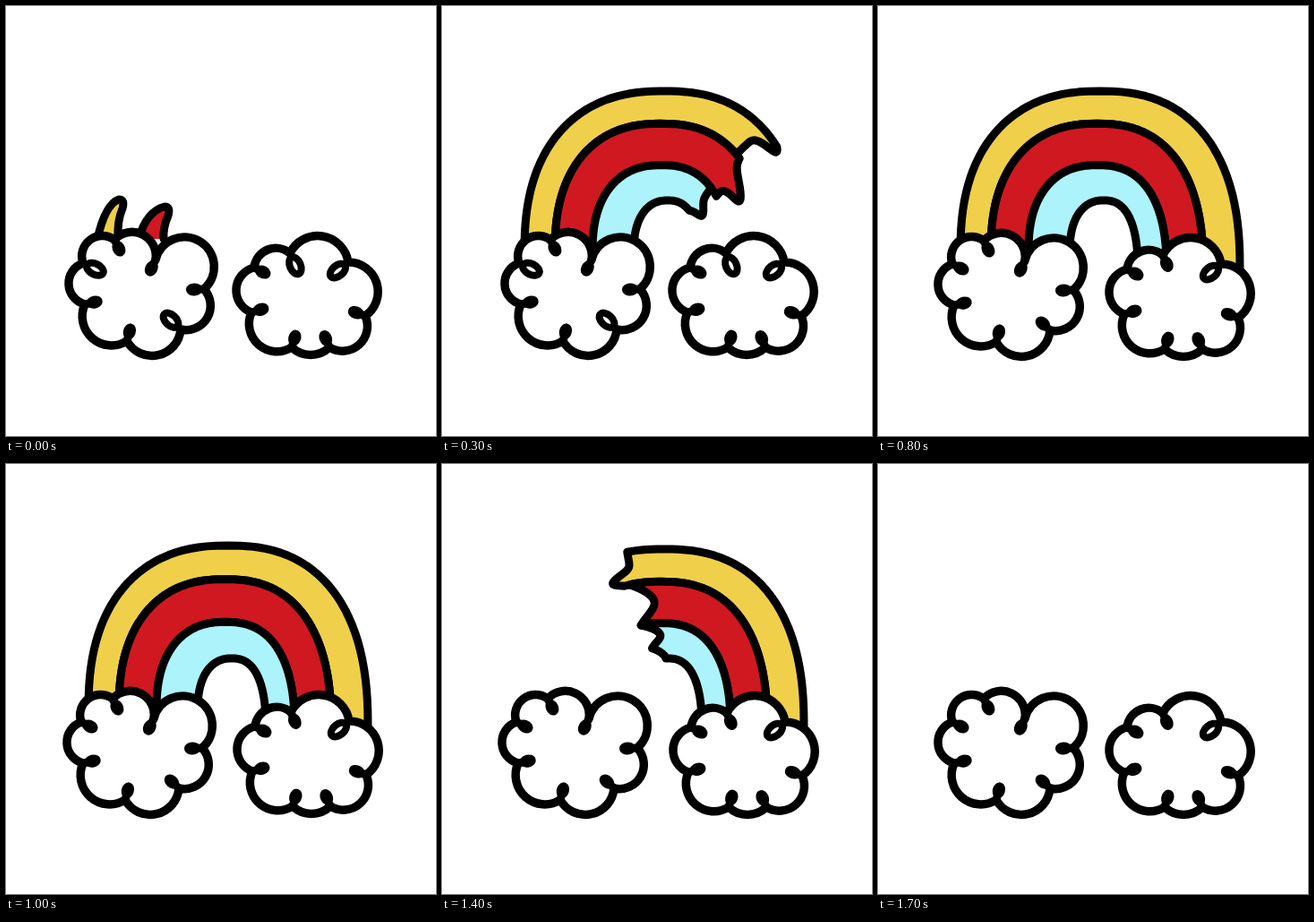
An HTML page with a canvas that plays this animation: 480x480 px, repeating every 1800 ms.

```html
<!DOCTYPE html>
<html lang="en">
<head>
<meta charset="utf-8">
<title>Rainbow</title>
<style>
  html, body { margin: 0; width: 100%; height: 100%; overflow: hidden; background: #fff; }
  canvas { display: block; width: 480px; height: 480px; }
</style>
</head>
<body>
<canvas id="stage" width="480" height="480"></canvas>
<script>
const ctx = document.getElementById('stage').getContext('2d');
const { PI, sin, cos, abs, sign, hypot, atan2 } = Math;
const STEP = 100, STEPS = 18;
const COLORS = ['#f0d04a', '#d01820', '#acf3fb'];

// Rainbow contours, outermost first: left foot, right foot, crown.
const ARCS = [[92, 404, 96], [126, 363, 132], [168, 322, 178], [214, 290, 217]];

// Ragged ends per band: offset along the arc, for u across the band.
const bump = (u, peak) => Math.exp(-(((u - peak) / .2) ** 2));
const HEAD = [
  u => .02 + .06 * bump(u, .08),
  u => .035 + .03 * u + .08 * bump(u, .5),
  u => .025 + .065 * bump(u, .72) - .05 * u ** 4
];
const TAIL = [
  u => .01 - .055 * bump(u, .82),
  u => .06 * sin(PI * u),
  u => .065 * abs(sin(1.5 * PI * u))
];

// Notches of each cloud, clockwise; a third value sets the bulge of the next lobe.
const CLOUDS = [
  {
    mid: [147, 320],
    notches: [[83, 288], [118, 262], [164, 284, .68], [218, 317], [192, 362], [132, 375], [85, 334]]
  },
  {
    mid: [338, 325],
    notches: [[278, 294, .3], [318, 278], [383, 288], [402, 348], [362, 383, .2], [320, 383], [275, 344]]
  }
];

// Three hand-drawn poses in rotation: cloud shifts, notches with open loops, crown lift.
const POSES = [
  { shift: [[3, -1], [-1, -2]], loops: [[0, 4], [1, 2]], lift: 1 },
  { shift: [[1, 0], [0, -1]], loops: [[], [2]], lift: 5 },
  { shift: [[0, 0], [0, 0]], loops: [[], [2]], lift: 1 }
];

const mix = (a, b, k) => a + (b - a) * k;
const clamp = n => Math.max(0, Math.min(1, n));
const sample = (n, fn) => Array.from({ length: n + 1 }, (_, i) => fn(i / n));

// Point at t (left foot 0, right foot 1) on the contour v, as a superellipse.
function place(t, v, lift) {
  const row = Math.min(Math.floor(v), 2);
  const [left, right, top] = ARCS[row].map((n, i) => mix(n, ARCS[row + 1][i], v - row));
  const c = -cos(PI * t), s = abs(sin(PI * t));
  const x = (1 + sign(c) * abs(c) ** (2 / 2.4)) / 2;
  const base = mix(276, 294, x), crown = top - lift * (1 - v / 3);
  return [mix(left, right, x), mix(base, crown, s ** (2 / 2.4))];
}

function band(i, root, end, lift) {
  const run = (v, from, to) => sample(60, k => place(mix(from, to, k), v, lift));
  ctx.beginPath();
  [
    ...run(i, root, end(0)),
    ...sample(30, u => place(end(u), i + u, lift)),
    ...run(i + 1, end(1), root)
  ].forEach(p => ctx.lineTo(...p));
  fillStroke(COLORS[i]);
}

function horn(x, width, tipX, tipY, color) {
  ctx.beginPath();
  ctx.moveTo(x, 260);
  ctx.quadraticCurveTo(x + 9, tipY + 5, tipX - 4, tipY);
  ctx.quadraticCurveTo(tipX + 3, tipY, tipX, tipY + 10);
  ctx.quadraticCurveTo(tipX - 6, tipY + 24, x + width, 260);
  fillStroke(color);
}

function fillStroke(color) {
  ctx.fillStyle = color;
  ctx.fill();
  ctx.stroke();
}

function rainbow(step, lift) {
  ctx.lineWidth = 9;
  if (step === 0) {
    horn(102, 23, 130, 216, COLORS[0]);
    horn(148, 28, 181, 224, COLORS[1]);
  } else if (step < 17) {
    const head = .5 + .21 * (step - 2), tail = .425 + .2 * (step - 14);
    COLORS.forEach((_, i) => {
      if (step < 5) band(i, 0, u => clamp(head + HEAD[i](u)), lift);
      else if (step > 12) band(i, 1, u => clamp(tail + TAIL[i](u)), lift);
      else band(i, 0, () => 1, lift);
    });
  }
}

// Curl running inwards from a notch, as a solid drop or an open loop.
function curl(x, y, turn, open) {
  const depth = open ? 15 : 11;
  ctx.save();
  ctx.translate(x, y);
  ctx.rotate(turn);
  ctx.lineWidth = open ? 8 : 9;
  ctx.beginPath();
  if (open) ctx.ellipse(depth, 0, 10, 6, 0, 0, 2 * PI);
  else {
    ctx.moveTo(0, 0);
    ctx.lineTo(depth, 0);
    ctx.ellipse(depth, 0, 4.5, 2.5, 0, 0, 2 * PI);
  }
  fillStroke(open ? '#fff' : '#000');
  ctx.restore();
}

function cloud({ mid, notches }, [dx, dy], loops) {
  let d = `M${notches[0][0]} ${notches[0][1]}`;
  notches.forEach(([x, y, bulge = .37], i) => {
    const [nx, ny] = notches[(i + 1) % notches.length];
    const chord = hypot(nx - x, ny - y);
    const r = chord * (1 / 4 + bulge * bulge) / (2 * bulge);
    d += `A${r} ${r} 0 ${bulge > .5 ? 1 : 0} 1 ${nx} ${ny}`;
  });
  const path = new Path2D(d + 'Z');
  ctx.save();
  ctx.translate(dx, dy);
  ctx.lineWidth = 9.5;
  ctx.fillStyle = '#fff';
  ctx.fill(path);
  ctx.stroke(path);
  notches.forEach(([x, y], i) => curl(x, y, atan2(mid[1] - y, mid[0] - x), loops.includes(i)));
  ctx.restore();
}

function draw(step) {
  const pose = POSES[step % POSES.length];
  ctx.fillStyle = '#fff';
  ctx.fillRect(0, 0, 480, 480);
  ctx.strokeStyle = '#000';
  ctx.lineCap = ctx.lineJoin = 'round';
  rainbow(step, pose.lift);
  CLOUDS.forEach((c, i) => cloud(c, pose.shift[i], pose.loops[i]));
}

const start = performance.now();
let shown = -1;
function tick() {
  const step = Math.floor((performance.now() - start) / STEP) % STEPS;
  if (step !== shown) draw(shown = step);
  requestAnimationFrame(tick);
}
tick();
</script>
</body>
</html>
```
